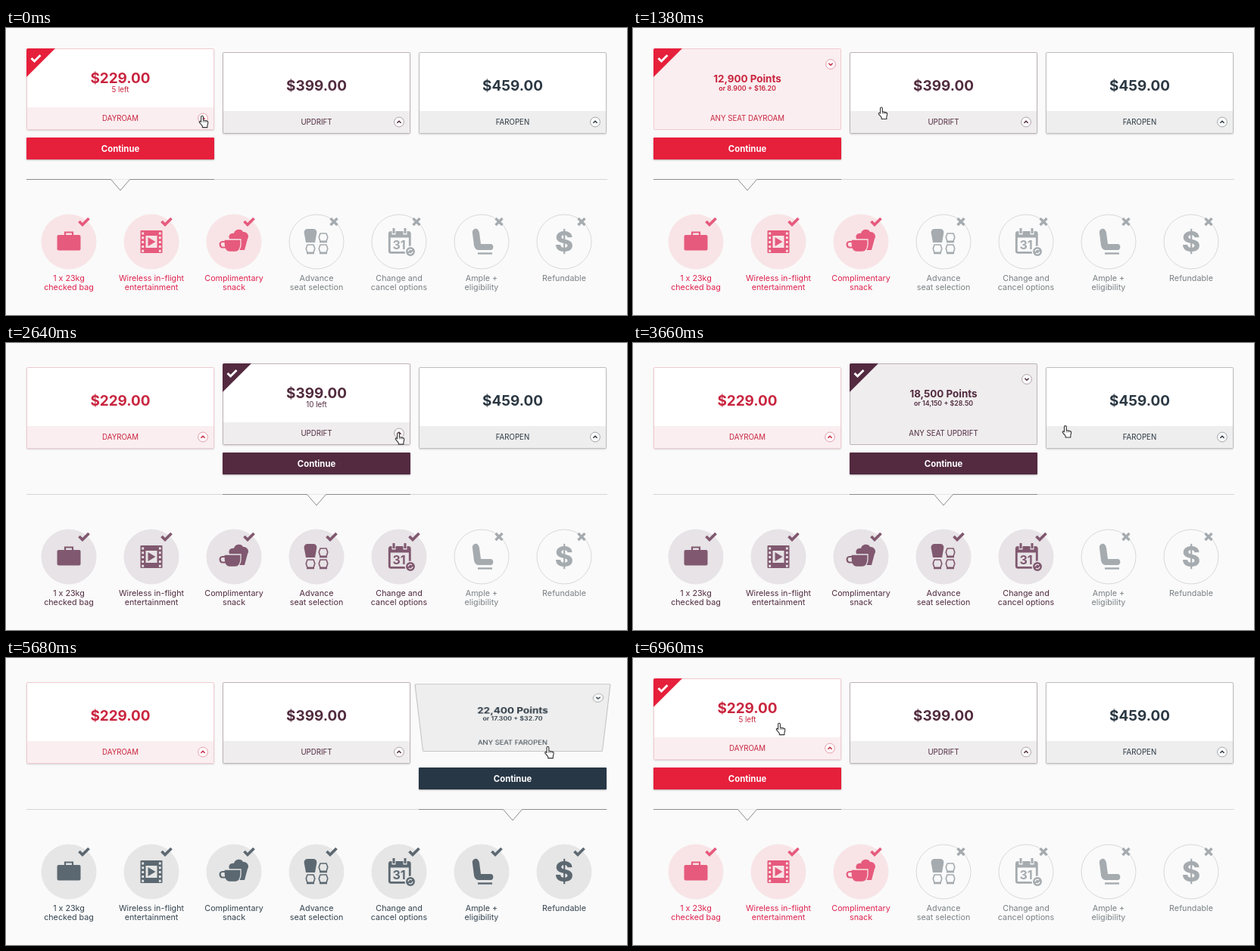
Animation of 820x380 px, one loop 7020 ms. Source, as an HTML page:

```html
<!DOCTYPE html>
<html lang="en">
<head>
<meta charset="utf-8">
<title>Fare cards</title>
<style>
  html, body { margin: 0; width: 100%; height: 100%; overflow: hidden; background: #fafafa; }
  body { position: relative; font-family: Inter, Roboto, sans-serif; }
  svg { position: absolute; left: 0; top: 0; overflow: visible; }
  svg text { text-anchor: middle; font-family: Inter, Roboto, sans-serif; }
  .card { position: absolute; top: 32px; width: 248px; height: 108px; }
  .face { position: absolute; inset: 0; box-sizing: border-box; overflow: hidden;
    border-radius: 2px; backface-visibility: hidden; }
  .front { background: #fff; box-shadow: inset 0 0 0 1px var(--edge), 0 1px 2px rgba(0,0,0,.15); }
  .back { background: var(--tint); box-shadow: inset 0 0 0 1px var(--edge); }
  .foot { position: absolute; left: 1px; right: 1px; top: 78px; bottom: 1px; background: var(--tint); }
  .t { position: absolute; left: 0; width: 100%; text-align: center; line-height: 20px;
    white-space: nowrap; color: var(--ink); }
  .price { font-size: 18.9px; font-weight: 700; }
  .left { font-size: 9.8px; }
  .name { font-size: 9.7px; }
  .pts { font-size: 13.4px; font-weight: 700; }
  .mix { font-size: 8.8px; font-weight: 600; }
  .button { position: absolute; width: 248px; height: 29px; border-radius: 1px; background: var(--main);
    color: #fff; font-size: 11.3px; font-weight: 700; line-height: 30px; text-align: center;
    box-shadow: 0 1px 2px rgba(0,0,0,.3); }
</style>
</head>
<body>
<svg id="board" width="820" height="380">
  <path d="M27 200.5H794" stroke="#d6d6d6"/>
  <path id="pointer" d="M-124 .5H-12.5L0 15L12.5 .5H124" fill="#fafafa" stroke="#8b8b8b"/>
</svg>
<div id="cards"></div>
<svg width="820" height="380">
  <g id="hand" fill="#fff" stroke="#333" stroke-width="1.1" stroke-linejoin="round">
    <path d="M-3.4-6.4a1.4 1.4 0 0 1 2.8 0V-2L4.3-1C5.6-.7 6 .1 5.8 1.6L4.9 5V7.6H-1.7V5.6L-5.5 1.2C-6.3 0-4.9-1.1-3.9-.2L-3.4.4Z"/>
    <path d="M-.6-2V1M1.6-1.5V1M3.8-1V1" stroke-width=".7"/>
  </g>
</svg>
<script>
const LOOP = 7020;
const PICK = [1899, 4301, 6480];
// spans in which the picture moves; it rests in between
const LIVE = [[240, 240], [400, 560], [720, 1040], [1200, 1460], [1680, 1680], [1860, 2520],
  [2600, 3220], [3360, 3360], [3520, 3840], [4020, 4080], [4320, 4880], [5020, 5040],
  [5200, 5360], [5520, 5540], [5680, 5840], [6000, 6000], [6160, 6240], [6480, 6960]];
const HAND = [[0, 261, 124], [1200, 261, 124], [1460, 360, 108], [1860, 412.5, 100.5], [2130, 412.5, 100.5],
  [2500, 520, 126.5], [3520, 520, 126.5], [3840, 640, 106], [4060, 685, 101], [4520, 685, 101],
  [4880, 752, 117], [5040, 778, 124], [5500, 778, 124], [5680, 718, 125], [6000, 540, 118],
  [6240, 290, 100], [6440, 195, 94], [LOOP, 195, 94]];

const FARES = [
  { x: 27, name: 'DAYROAM', price: '$229.00', left: '5 left', pts: '12,900 Points', mix: 'or 8.900 + $16.20',
    main: '#e61f3b', ink: '#c9253f', tint: '#faeef0', edge: '#efcbd0',
    icon: [230, 90, 125], disc: [248, 228, 230], label: [222, 34, 78], perks: 3, on: -540, off: PICK[0], flip: 432 },
  { x: 286, name: 'UPDRIFT', price: '$399.00', left: '10 left', pts: '18,500 Points', mix: 'or 14,150 + $28.50',
    main: '#532a40', ink: '#512b3e', tint: '#efedee', edge: '#bdb3b8',
    icon: [128, 88, 111], disc: [231, 227, 230], label: [80, 42, 62], perks: 5, on: PICK[0], off: PICK[1], flip: 2780 },
  { x: 545, name: 'FAROPEN', price: '$459.00', left: '15 left', pts: '22,400 Points', mix: 'or 17.300 + $32.70',
    main: '#273746', ink: '#2b3843', tint: '#eeeeee', edge: '#bfbfbf',
    icon: [92, 104, 113], disc: [230, 230, 230], label: [52, 67, 79], perks: 7, on: PICK[1], off: PICK[2], flip: 5392 }
];
const OFF = { icon: [165, 171, 175], disc: [250, 250, 250], label: [122, 128, 132], edge: [217, 217, 217] };

const PERKS = [
  ['1 x 23kg', 'checked bag', `<rect x="-15.5" y="-9" width="31" height="20.5" rx="2"/>
    <path d="M-5-9V-12.5H5V-9" fill="none" stroke="currentColor" stroke-width="2.2"/>`],
  ['Wireless in-flight', 'entertainment', `<rect x="-14.5" y="-15" width="29" height="30" rx="1"/>
    <path d="M-11.3-12.5V14M11.3-12.5V14" stroke="var(--disc)" stroke-width="2.8" stroke-dasharray="3 2.8"/>
    <rect x="-7.5" y="-8" width="15" height="16" fill="var(--disc)"/><path d="M-4.5-6L5.5 0L-4.5 6Z"/>`],
  ['Complimentary', 'snack', `<path d="M-6-4C-8-9-4-12 0-11C1-17 10-18 12-13C17-14 21-8 18-4L14 11H0Z"/>
    <path d="M-13-3H9V3C9 9 6 13.5 2 13.5H-6C-10 13.5-13 9-13 3Z" stroke="var(--disc)" stroke-width="1.3"/>
    <path d="M-12 0H-15C-20 0-19 7-15 7.5H-11" fill="none" stroke="currentColor" stroke-width="2.2"/>`],
  ['Advance', 'seat selection', `<path d="M-12-17H-4C0-17 1-13 0-10L-2 1H-14L-16-10C-17-13-16-17-12-17Z"/>` +
    [[9, -5], [-8, 10], [9, 10]].map(([x, y]) => `<g transform="translate(${x} ${y})" fill="none" stroke="currentColor">
      <path d="M-4-6H4L5.8-1L4 4.5H-4L-5.8-1Z" stroke-width="1.6" stroke-linejoin="round"/>
      <path d="M-5 5H5" stroke-width="2.6"/></g>`).join('')],
  ['Change and', 'cancel options', `<rect x="-12.7" y="-12.7" width="27" height="27" rx="2" fill="none"
      stroke="currentColor" stroke-width="2.8"/><path d="M-13-13H14.5V-5.5H-13Z"/>
    <path d="M-7-18V-9.5M8-18V-9.5" stroke="var(--disc)" stroke-width="5"/>
    <path d="M-7-18V-11M8-18V-11" stroke="currentColor" stroke-width="3"/>
    <text y="10" font-size="16" font-weight="700">31</text>
    <circle cx="15" cy="13" r="6.7" stroke="var(--disc)" stroke-width="1.5"/>
    <path d="M12 13A3 3 0 0 1 17 11M18 13A3 3 0 0 1 13 15" fill="none" stroke="var(--disc)" stroke-width="1.3"/>`],
  ['Ample +', 'eligibility', `<path d="M-9-17C-6-18-4-16-3-12L-1 3H12C16.5 3 16.5 11 12 11H-3C-7 11-9 9-10 5L-12-11C-12.5-15-11-16-9-17Z"/>
    <path d="M-5 15.5H14" stroke="currentColor" stroke-width="2.4"/>`],
  ['Refundable', '', `<text y="13" font-size="37" font-weight="800">$</text>`]
];

const $ = id => document.getElementById(id);
const clamp = v => Math.max(0, Math.min(1, v));
const ease = (t, start, span) => { const p = clamp((t - start) / span); return p * p * (3 - 2 * p); };
const mix = (a, b, p) => a + (b - a) * p;
const rgb = (a, b, p) => `rgb(${a.map((v, i) => Math.round(mix(v, b[i], p)))})`;
const text = (kind, y, s) => `<div class="t ${kind}" style="top:${y - 10}px">${s}</div>`;

const corner = `<svg class="corner" width="38" height="38"><path d="M0 0H38L0 38Z" fill="var(--main)"/>
  <path d="M6.5 13L10.5 17L18.5 9" fill="none" stroke="#fff" stroke-width="3"/></svg>`;
const chevron = `<svg class="chev" width="1" height="1" fill="none" stroke="var(--ink)">
  <circle r="6.4" fill="#fff" fill-opacity=".7" stroke-opacity=".4"/><path d="M-2.6 1.3L0-1.3L2.6 1.3" stroke-width="1.5"/></svg>`;

const cards = FARES.map(f => {
  const box = document.createElement('div');
  for (const k of ['main', 'ink', 'tint', 'edge']) box.style.setProperty('--' + k, f[k]);
  box.innerHTML = `<div class="button" style="left:${f.x}px">Continue</div>
    <div class="card" style="left:${f.x}px">
      <div class="face back">${corner}${text('pts', 39.5, f.pts)}${text('mix', 52.5, f.mix)}
        ${text('name', 92.5, 'ANY SEAT ' + f.name)}${chevron}</div>
      <div class="face front"><div class="foot"></div>${corner}${text('price', 44.5, f.price)}${text('left', 55, f.left)}
        ${text('name', 92.5, f.name)}${chevron}</div>
    </div>`;
  $('cards').append(box);
  const q = s => box.querySelector(s);
  const side = s => ({ el: q(s), corner: q(s + ' .corner'), chev: q(s + ' .chev') });
  return { f, button: q('.button'), card: q('.card'), front: side('.front'), back: side('.back'),
    foot: q('.foot'), price: q('.price'), left: q('.left') };
});

const perks = PERKS.map(([a, b, art], i) => {
  const g = document.createElementNS('http://www.w3.org/2000/svg', 'g');
  g.setAttribute('transform', `translate(${83 + i * 109} 283)`);
  g.innerHTML = `<circle r="36" fill="var(--disc)" stroke="var(--rim)"/>
    <g fill="currentColor">${art}</g>
    <path class="yes" d="M13.5-27L18-22.5L26.5-31" fill="none" stroke="currentColor" stroke-width="3.7"/>
    <path class="no" d="M18.5-31L27.5-22M27.5-31L18.5-22" stroke="currentColor" stroke-width="3.4"/>
    <g fill="var(--label)" font-size="10.75"><text y="52">${a}</text><text y="64">${b}</text></g>`;
  $('board').append(g);
  return { g, yes: g.querySelector('.yes'), no: g.querySelector('.no') };
});

function rest(t) {
  let last = 0;
  for (const [a, b] of LIVE) {
    if (t < a) return last;
    if (t <= b) return t;
    last = b;
  }
  return last;
}

function pose(side, angle, alpha) {
  side.el.style.transform = angle ? `perspective(700px) rotateX(${angle}deg)` : 'none';
  side.el.style.visibility = Math.abs(angle) < 90 && alpha > 0 ? 'visible' : 'hidden';
  side.el.style.opacity = alpha;
}

function drawCard(c, i, time) {
  const f = c.f, t = i === 0 && time > 6300 ? time - LOOP : time;
  const leaving = t > f.off;
  const gone = ease(t, f.off + 76, 170);
  const shown = clamp(gone * 1.35);
  const up = ease(t, f.on + 76, 125) * (1 - gone);
  const turn = 180 * ease(t, f.flip, 400);
  pose(c.front, leaving ? 0 : turn, leaving ? shown : 1);
  pose(c.back, leaving ? 0 : turn - 180, leaving ? 1 - gone : 1);
  c.card.style.transform = `translateY(${-5 * up}px)`;
  c.button.style.top = mix(leaving ? 122 : 128, 145, up) + 'px';
  c.button.style.opacity = leaving ? up ** 1.6 : up;
  // the tint of the back shrinks into the footer
  c.foot.style.top = (leaving ? 78 * shown : 78) + 'px';
  c.price.style.transform = `translateY(${-5 * up}px)`;
  c.left.style.opacity = up;
  c.front.corner.style.opacity = leaving ? up * up : up;
  c.back.corner.style.opacity = up * ease(t, f.flip + 400, 160);
  [c.back, c.front].forEach((side, front) => {
    const p = leaving ? shown : front;
    side.chev.style.transform = `translate(233px, ${mix(20, 92.5, p)}px) rotate(${180 * (1 - p)}deg)`;
  });
}

function drawPerks(t) {
  const n = PICK.filter(p => t >= p).length;
  const from = FARES[n ? n - 1 : 0], to = FARES[n % 3];
  const p = n ? ease(t, PICK[n - 1] + 104, 54) : 1;
  perks.forEach(({ g, yes, no }, i) => {
    const had = i < from.perks, has = i < to.perks;
    const u = had ? from : OFF, v = has ? to : OFF;
    g.style.color = rgb(u.icon, v.icon, p);
    g.style.setProperty('--disc', rgb(u.disc, v.disc, p));
    g.style.setProperty('--rim', rgb(had ? u.disc : u.edge, has ? v.disc : v.edge, p));
    g.style.setProperty('--label', rgb(u.label, v.label, p));
    const on = mix(+had, +has, p);
    yes.style.opacity = on;
    no.style.opacity = 1 - on;
  });
  const mid = k => FARES[k % 3].x + 124;
  const x = n ? mix(mid(n - 1), mid(n), ease(t, PICK[n - 1], 260)) : mid(0);
  $('pointer').setAttribute('transform', `translate(${x} 200)`);
}

function drawHand(t) {
  const k = HAND.findIndex(h => h[0] > t);
  const [t0, x0, y0] = HAND[k - 1], [t1, x1, y1] = HAND[k];
  const p = (t - t0) / (t1 - t0);
  $('hand').setAttribute('transform', `translate(${mix(x0, x1, p)} ${mix(y0, y1, p)})`);
}

function draw() {
  const t = rest(performance.now() % LOOP);
  cards.forEach((c, i) => drawCard(c, i, t));
  drawPerks(t);
  drawHand(t);
  requestAnimationFrame(draw);
}
draw();
</script>
</body>
</html>
```
